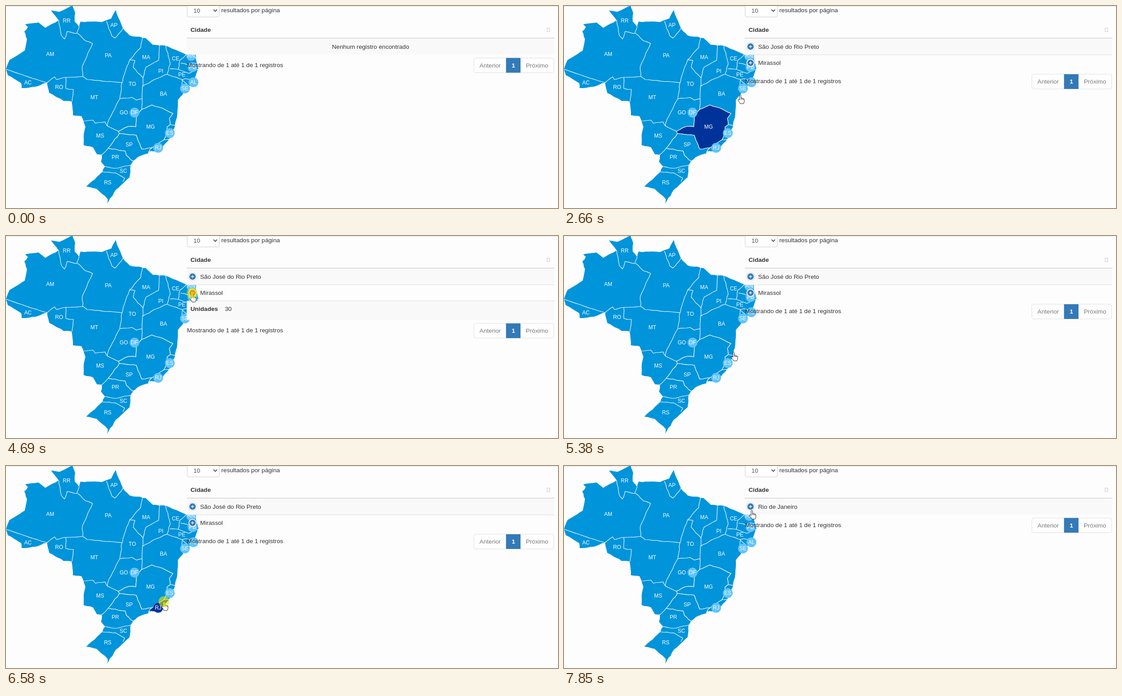
Recreate the animation shown at these times as an HTML page. Size 1237 by 453 pixels, loop 8 s.

```html
<!DOCTYPE html>
<html lang="pt-BR">
<head>
<meta charset="utf-8">
<style>
  html, body { margin: 0; width: 100%; height: 100%; overflow: hidden; background: #fdfdfd; }
  svg { display: block; width: 1237px; height: 453px; font: 13.67px "Liberation Sans", Arial, sans-serif; fill: #333; }
  .labels { font-size: 12px; fill: #fff; text-anchor: middle; }
  .state, .borders { stroke: #fff; stroke-width: 1.15; stroke-linejoin: round; }
  .borders { fill: none; }
  .cursor { fill: #fff; stroke: #222; stroke-linejoin: round; }
  .bold { font-weight: bold; }
  .middle { text-anchor: middle; }
</style>
</head>
<body>
<svg viewBox="0 0 1237 453">
  <path d="M0 .5H1237" stroke="#dcdcdc"/>
  <g id="map"></g>
  <g id="table"></g>
  <g id="pointer">
    <path id="arrow" class="cursor" d="M0 0V16L4 12.5L6.5 18.5L9 17.5L6.5 11.5H11.5Z"/>
    <g id="hand" class="cursor">
      <path d="M-1.6 1.5Q0-1 1.6 1.5V7.5Q3.6 6 4.2 8.3Q6.2 7 6.8 9.3Q9 8.6 9 11V14.5Q9 17 7.3 20H0Q-1 17-5 12.5Q-5 10-3 10.5L-1.6 12Z"/>
      <path d="M1.6 7.5V11M4.2 8.3V11.3M6.8 9.3V11.6" fill="none"/>
    </g>
    <circle id="click" r="12" fill="#eaea00" fill-opacity=".58"/>
  </g>
</svg>
<script>
const LOOP = 8000, BLUE = '#0094db', NAVY = '#003399', SKY = '#5fc3fb';
const el = id => document.getElementById(id);

// Key points of each line; roughen() adds the small irregularities.
const coast = {
  north: '0,142 8,121 42,100 47,74 41,57 49,47 43,41 73,37 88,49 118,32 101,10 120,13 149,-1 155,16 154,35 164,47 167,35 215,36 236,28 246,9 262,50 277,66 313,72',
  east: '329,87 358,89 404,109 424,114 431,140 420,169 385,211 383,250 378,272 366,299',
  rio: '366,299 353,314 338,326 320,327',
  santos: '320,327 319,331 300,337 285,348',
  south: '279,357 277,384 246,412 226,444 228,433 203,410 180,405 216,372 222,360 213,349 215,335 204,333',
  west: '195,317 174,312 174,292 178,271 169,247 150,245 147,214 129,213 97,195 92,172 66,181 35,184 34,173 4,155'
};
const borders = {
  goMg: '254,286 252,281 275,270 291,271 292,250 304,232',
  baMg: '304,232 327,222 350,229 374,241 366,252 368,266',
  esMg: '368,266 361,271 362,280 354,300',
  rjMg: '354,300 327,318',
  mgSp: '327,318 304,321 296,302 292,290 254,286',
  rjSp: '327,318 320,327',
  esRj: '354,300 366,299',
  prSp: '285,348 270,335 267,325 229,319',
  msSp: '229,319 240,305 254,286',
  msPr: '204,333 214,334 229,319',
  prSc: '222,360 243,364 279,357',
  rsSc: '216,372 245,374 266,386 262,394',
  baEs: '368,266 379,268',
  acAm: '0,142 85,170 92,172',
  amRr: '118,32 124,66 131,74 137,57 158,62 164,47',
  amPa: '160,61 178,78 194,84 171,135 172,158',
  amRo: '92,172 109,159 113,165 134,160 172,158',
  mtPa: '172,158 182,165 260,172',
  mtRo: '134,160 134,185 151,187 148,214',
  apPa: '225,34 237,67 244,72 262,50',
  maPa: '306,71 302,93 277,121 262,163 260,172',
  maTo: '277,121 289,122 285,137 307,161 305,208',
  goTo: '255,208 282,205 292,211 305,208 304,232',
  mtTo: '260,172 255,208 228,262 227,269',
  goMs: '170,258 195,256 200,263 222,260 227,269 252,281',
  maPi: '344,88 342,122 314,137 307,161',
  cePi: '358,89 368,130 361,153',
  baPi: '361,153 330,166 306,180',
  ceRn: '367,141 386,142 390,121 404,109',
  pbRn: '391,128 408,132 429,128',
  pbPe: '386,142 410,151 431,142',
  alPe: '361,153 395,165 402,163 421,168',
  alSe: '395,165 410,179',
  baSe: '395,165 393,183 398,196'
};
// Edges around each clickable state; a minus walks the edge backwards.
const states = {
  MG: 'goMg baMg esMg rjMg mgSp',
  SP: '-mgSp rjSp santos prSp msSp',
  RJ: '-rjMg esRj rio -rjSp'
};
const labels = { RR: [136, 33], AP: [242, 43], AM: [99, 108], PA: [229, 111], MA: [314, 115], CE: [380, 118],
  PI: [347, 146], PE: [394, 154], AC: [49, 172], RO: [119, 182], TO: [283, 175], BA: [353, 197], MT: [198, 205],
  GO: [264, 239], MG: [324, 271], MS: [211, 291], SP: [276, 311], PR: [245, 339], SC: [263, 370], RS: [228, 396] };
const badges = { RN: [415, 112], PB: [418, 137], AL: [420, 171], SE: [401, 185], DF: [288, 239], ES: [367, 285], RJ: [341, 318] };

let seed = 7;
const random = () => (seed = seed * 16807 % 2147483647) / 2147483647;

function roughen(line) {
  const points = line.split(' ').map(p => p.split(',').map(Number));
  return points.flatMap(([x, y], i) => {
    if (!i) return [[x, y]];
    const [px, py] = points[i - 1], pieces = Math.ceil(Math.hypot(x - px, y - py) / 9);
    return Array.from({ length: pieces }, (_, k) => {
      const f = (k + 1) / pieces, wobble = f < 1 ? 1.8 : 0;
      return [px + (x - px) * f + (random() - .5) * wobble, py + (y - py) * f + (random() - .5) * wobble];
    });
  });
}

const edges = {};
for (const [name, line] of Object.entries({ ...coast, ...borders })) edges[name] = roughen(line);
const around = names => names.flatMap(n => n[0] === '-' ? edges[n.slice(1)].slice().reverse() : edges[n]).join(' ');

const text = (x, y, s, attrs = '') => `<text x="${x}" y="${y}" ${attrs}>${s}</text>`;
const rect = (x, y, w, h, attrs) => `<rect x="${x}" y="${y}" width="${w}" height="${h}" ${attrs}/>`;
const each = (obj, fn) => Object.entries(obj).map(([k, v]) => fn(k, v)).join('');

el('map').innerHTML =
  `<polygon fill="${BLUE}" points="${around(Object.keys(coast))}"/>` +
  `<g class="borders">${each(borders, name => `<polyline points="${edges[name].join(' ')}"/>`)}</g>` +
  each(states, (id, names) => `<polygon class="state" id="state${id}" points="${around(names.split(' '))}"/>`) +
  `<g class="labels">${each(labels, (id, [x, y]) => text(x, y + 4, id))}` +
  each(badges, (id, [x, y]) => `<circle id="badge${id}" cx="${x}" cy="${y}" r="11" fill="${SKY}"/>` + text(x, y + 4, id)) + '</g>';

function toggleIcon(y, open) {
  return `<circle cx="418" cy="${y}" r="9.8" fill="#999" fill-opacity=".45"/><circle cx="418" cy="${y}" r="9" fill="#fff"/>
    <circle cx="418" cy="${y}" r="7.2" fill="${open ? '#d33333' : '#337ab7'}"/>
    <path d="M414.5 ${y}h7${open ? '' : `M418 ${y - 3.5}v7`}" stroke="#fff" stroke-width="1.3"/>`;
}

function pager(y) {
  const label = (x, s, attrs) => text(x, Math.floor(y + 21.5), s, attrs);
  return rect(1048.5, y, 179, 33, 'rx="4" fill="#fff" stroke="#ddd"') + rect(1120.5, y, 32.5, 33, 'fill="#337ab7"') +
    label(1085, 'Anterior', 'class="middle" fill="#777"') +
    label(1137, '1', 'class="middle bold" fill="#fff"') +
    label(1190, 'Próximo', 'class="middle" fill="#777"');
}

function tableMarkup({ cities, open }) {
  const extra = (cities.length > 1 ? 36.5 : 0) + (open ? 43 : 0);
  const line = y => rect(405, y, 824, 1, 'fill="#ddd"');
  let out = rect(406, -8, 72, 32.5, 'rx="4" fill="#fff" stroke="#ccc"') +
    text(420, 14.5, '10', 'fill="#555"') +
    '<path d="M465 8l4 4 4-4" fill="none" stroke="#333" stroke-width="1.6"/>' +
    text(482.5, 14, 'resultados por página') + text(413.5, 58, 'Cidade', 'class="bold"') +
    rect(1212.5, 49.5, 6, 8, 'fill="none" stroke="#ccc"') +
    rect(405, 71, 824, 2, 'fill="#ddd"') + rect(405, 73, 824, 36, 'fill="#f9f9f9"');
  if (!cities.length) out += text(817, 96, 'Nenhum registro encontrado', 'class="middle"');
  cities.forEach((city, i) => {
    const y = 91 + i * 36.5;
    if (i) out += line(109);
    out += toggleIcon(y, open && i) + text(435, Math.floor(y + 5), city);
  });
  if (open) out += rect(405, 146, 824, 42, 'fill="#f9f9f9"') + line(145) +
    text(413.5, 168, 'Unidades', 'class="bold"') + text(490.5, 168, '30');
  return out + text(405.5, Math.floor(137 + extra), 'Mostrando de 1 até 1 de 1 registros') + pager(116.5 + extra);
}

const paulista = ['São José do Rio Preto', 'Mirassol'];
const tables = [
  [0, { cities: [] }], [2000, { cities: paulista }], [4090, { cities: paulista, open: true }],
  [4890, { cities: paulista }], [6780, { cities: ['Rio de Janeiro'] }]
];
const hovers = [[0, ''], [980, 'SP'], [1250, 'MG'], [1390, 'SP'], [2600, 'MG'], [2730, ''], [6000, 'RJ'], [7110, '']];
const clicks = [1800, 3890, 4690, 6580];

// Pointer moves: first step, last step, destination.
const STEP = 68;
const moves = [
  [390, 580, 433, 341], [840, 1050, 300, 321], [1250, 1320, 330, 290], [1390, 1460, 282, 320],
  [2600, 2660, 395, 199], [2730, 2730, 440, 152], [3080, 3620, 417, 128], [5170, 5380, 380, 260],
  [5640, 6190, 354, 304], [7110, 7320, 418, 115], [7580, 7850, 421, 99]
];

function pointerAt(t) {
  let x = 1314, y = 460;
  for (const [start, end, toX, toY] of moves) {
    if (t < start) break;
    const steps = Math.round((end - start) / STEP) + 1;
    const step = t >= end ? steps : 1 + Math.floor((t - start) / (end - start) * (steps - 1));
    const p = 1 - (1 - step / steps) ** 1.15;
    x += (toX - x) * p;
    y += (toY - y) * p;
  }
  return [Math.round(x), Math.round(y)];
}

const current = (list, t) => list.filter(([at]) => t >= at).pop()[1];
const show = (id, on) => el(id).style.display = on ? '' : 'none';
let shownTable;

function draw(t) {
  const table = current(tables, t), hover = current(hovers, t), [x, y] = pointerAt(t);
  if (table !== shownTable) el('table').innerHTML = tableMarkup(shownTable = table);
  for (const id in states) el('state' + id).style.fill = id === hover ? NAVY : BLUE;
  el('badgeRJ').setAttribute('fill', hover === 'RJ' ? NAVY : SKY);
  el('pointer').setAttribute('transform', `translate(${x} ${y})`);
  show('hand', x < 430);
  show('arrow', x >= 430);
  show('click', clicks.some(at => t >= at && t < at + 200));
}

const begin = performance.now();
function tick() {
  draw((performance.now() - begin) % LOOP);
  requestAnimationFrame(tick);
}
tick();
</script>
</body>
</html>
```
